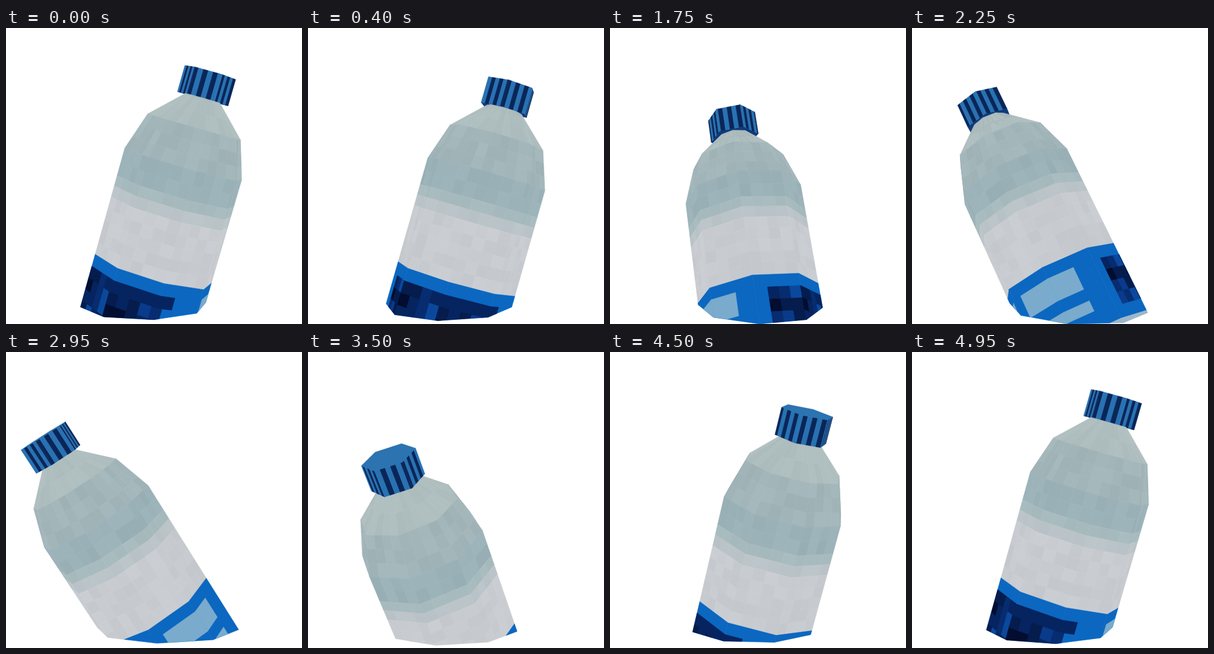
Recreate the animation shown at these times as an HTML page with a canvas. Size 500x500 px, loop 5000 ms.

```html
<!DOCTYPE html>
<html lang="en">
<head>
<meta charset="utf-8">
<title>Floating bottle</title>
<style>
  html, body { margin: 0; width: 100%; height: 100%; overflow: hidden; background: #fff; }
  canvas { display: block; width: 500px; height: 500px; }
</style>
</head>
<body>
<canvas id="stage" width="500" height="500"></canvas>
<script>
const ctx = document.getElementById('stage').getContext('2d');
const LOOP = 5000, STEP = 50, RAD = Math.PI / 180;

// Camera: distance, downward pitch, height of the view centre above the water
const DIST = 1500, PITCH = 5 * RAD, EYE = 221;
const CP = Math.cos(PITCH), SP = Math.sin(PITCH);

// Distances along the axis are measured down from the top of the cap
const PIVOT = 346, CAP_END = 45.5;
const PROFILE = [[45, 31], [95, 83], [160, 104.5], [500, 104]];
const BODY = { sides: 8, phase: 9 * RAD, radius: bodyRadius, patches: [] };
const CAP = { sides: 6, phase: 21.6 * RAD, radius: () => 44.3, patches: [] };

const BLUE = '#0b67c0', PANE = '#7aabcc', CAP_LIGHT = '#2872b2', CAP_DARK = '#0a2659';
const NAVY = ['#06245f', '#072c70', '#0a3a8a', '#051c4c', '#06245f', '#0b489c', '#020d30'];

// from, to, rows, colour, variation
const BANDS = [
  [45, 95, 2, [174, 189, 190], 5],
  [95, 160, 3, [162, 181, 185], 8],
  [160, 208, 2, [154, 177, 183], 7],
  [208, 226, 1, [167, 187, 190], 4],
  [226, 245, 1, [186, 195, 199], 4],
  [245, 346, 5, [199, 203, 208], 7],
  [470, 500, 1, [154, 182, 199], 6]
];

let seed = 41;
function rnd() {
  seed = (seed * 16807) % 2147483647;
  return seed / 2147483647;
}

function bodyRadius(s) {
  let i = 0;
  while (i < PROFILE.length - 2 && s > PROFILE[i + 1][0]) i++;
  const [s0, r0] = PROFILE[i], [s1, r1] = PROFILE[i + 1];
  return r0 + (r1 - r0) * (s - s0) / (s1 - s0);
}

// Texture patches: u counts faces round a shape, s runs down the axis
function patch(shape, u0, u1, s0, s1, color) {
  for (let a = u0; a < u1 - 1e-6;) {
    const b = Math.min(Math.floor(a + 1e-6) + 1, u1);
    shape.patches.push([a, b, s0, s1, color]);
    a = b;
  }
}

function buildBody() {
  for (const [from, to, rows, rgb, vary] of BANDS) {
    const h = (to - from) / rows;
    for (let j = 0; j < rows; j++) {
      for (let i = 0; i < 32; i++) {
        const d = (rnd() - 0.5) * vary;
        const c = rgb.map(v => Math.round(v + d));
        patch(BODY, i / 4, (i + 1) / 4, from + j * h, from + (j + 1) * h, `rgb(${c})`);
      }
    }
  }
  patch(BODY, 0, 8, 346, 470, BLUE);
  const w = 0.237;
  for (let i = 0; i < 13; i++) {
    const u = -2.72 + i * w, rows = i === 12 ? 1 : 4;
    for (let j = 0; j < rows; j++) {
      const c = j === 0 && i > 5 ? NAVY[0] : NAVY[Math.floor(rnd() * NAVY.length)];
      patch(BODY, u, u + w, 367 + j * 20.5, 387.5 + j * 20.5, c);
    }
  }
  for (const [u0, u1] of [[1.2, 2.7], [3.2, 4.57]]) {
    patch(BODY, u0, u1, 366, 405, PANE);
    patch(BODY, u0, u1, 425, 443, PANE);
  }
}

function buildCap() {
  const w = 6 / 32;
  for (let i = 0; i < 32; i++) {
    const u = 0.0625 + i * w;
    patch(CAP, u, u + w, 0, CAP_END, i % 2 ? CAP_LIGHT : CAP_DARK);
  }
}

let pose;
function setPose(ms) {
  const yaw = ms / LOOP * 2 * Math.PI;
  const c = Math.cos(yaw), n = Math.sin(yaw);
  const c2 = Math.cos(2 * yaw), n2 = Math.sin(2 * yaw);
  // the bottle rocks and bobs while the view circles round it
  const tx = 0.395 - 0.118 * c + 0.015 * n - 0.005 * c2;
  const tz = 0.12 - 0.108 * c - 0.02 * c2 + 0.02 * n2;
  const x = tx * c + tz * n, z = tz * c - tx * n;
  pose = {
    x, z, y: Math.sqrt(1 - x * x - z * z),
    turn: yaw - 0.6 * tx * tz,
    rise: 25.5 + 36.5 * c2 + 4 * n - 2.5 * n2
  };
}

// Point on a prism surface, tilted and placed in the world
function place(shape, u, s) {
  const i = Math.floor(u + 1e-9), f = u - i, r = shape.radius(s);
  const a = shape.phase + pose.turn + i * 2 * Math.PI / shape.sides;
  const b = a + 2 * Math.PI / shape.sides;
  const px = r * (Math.sin(a) * (1 - f) + Math.sin(b) * f);
  const pz = r * (Math.cos(a) * (1 - f) + Math.cos(b) * f);
  const py = PIVOT - s, { x, y, z } = pose, k = 1 / (1 + y);
  return [
    px * (1 - x * x * k) + py * x - pz * x * z * k,
    pose.rise - px * x + py * y - pz * z,
    -px * x * z * k + py * z + pz * (1 - z * z * k)
  ];
}

function clipWater(pts) {
  const out = [];
  pts.forEach((p, i) => {
    const q = pts[(i + 1) % pts.length];
    if (p[1] >= 0) out.push(p);
    if ((p[1] >= 0) !== (q[1] >= 0)) {
      const f = p[1] / (p[1] - q[1]);
      out.push(p.map((v, j) => v + (q[j] - v) * f));
    }
  });
  return out;
}

function project([x, h, z]) {
  const y = (h - EYE) * CP - z * SP;
  const k = DIST / (DIST - (h - EYE) * SP - z * CP);
  return [250 + x * k, 250 - y * k];
}

function area(pts) {
  return pts.reduce((sum, p, i) => {
    const q = pts[(i + 1) % pts.length];
    return sum + p[0] * q[1] - q[0] * p[1];
  }, 0);
}

function fill(world, color, side = 1) {
  const pts = clipWater(world).map(project);
  if (pts.length < 3 || area(pts) * side <= 0) return;
  ctx.beginPath();
  pts.forEach(p => ctx.lineTo(p[0], p[1]));
  ctx.closePath();
  ctx.fillStyle = ctx.strokeStyle = color;
  ctx.fill();
  ctx.stroke();
}

function drawSides(shape) {
  for (const [u0, u1, s0, s1, color] of shape.patches) {
    fill([place(shape, u0, s0), place(shape, u1, s0), place(shape, u1, s1), place(shape, u0, s1)], color);
  }
}

function ring(s) {
  return Array.from({ length: 6 }, (_, i) => place(CAP, i, s));
}

function drawCap() {
  fill(ring(CAP_END), '#0f3a7a');
  drawSides(CAP);
  fill(ring(0), '#2b73b1', -1);
}

function draw(ms) {
  setPose(ms);
  ctx.clearRect(0, 0, 500, 500);
  ctx.lineWidth = 0.6;
  ctx.lineJoin = 'round';
  const fromBelow = area(ring(CAP_END).map(project)) > 0;
  if (fromBelow) drawCap();
  drawSides(BODY);
  if (!fromBelow) drawCap();
}

buildBody();
buildCap();
const start = performance.now();
function tick() {
  const t = (performance.now() - start) % LOOP;
  draw(Math.floor(t / STEP) * STEP);
  requestAnimationFrame(tick);
}
tick();
</script>
</body>
</html>
```
